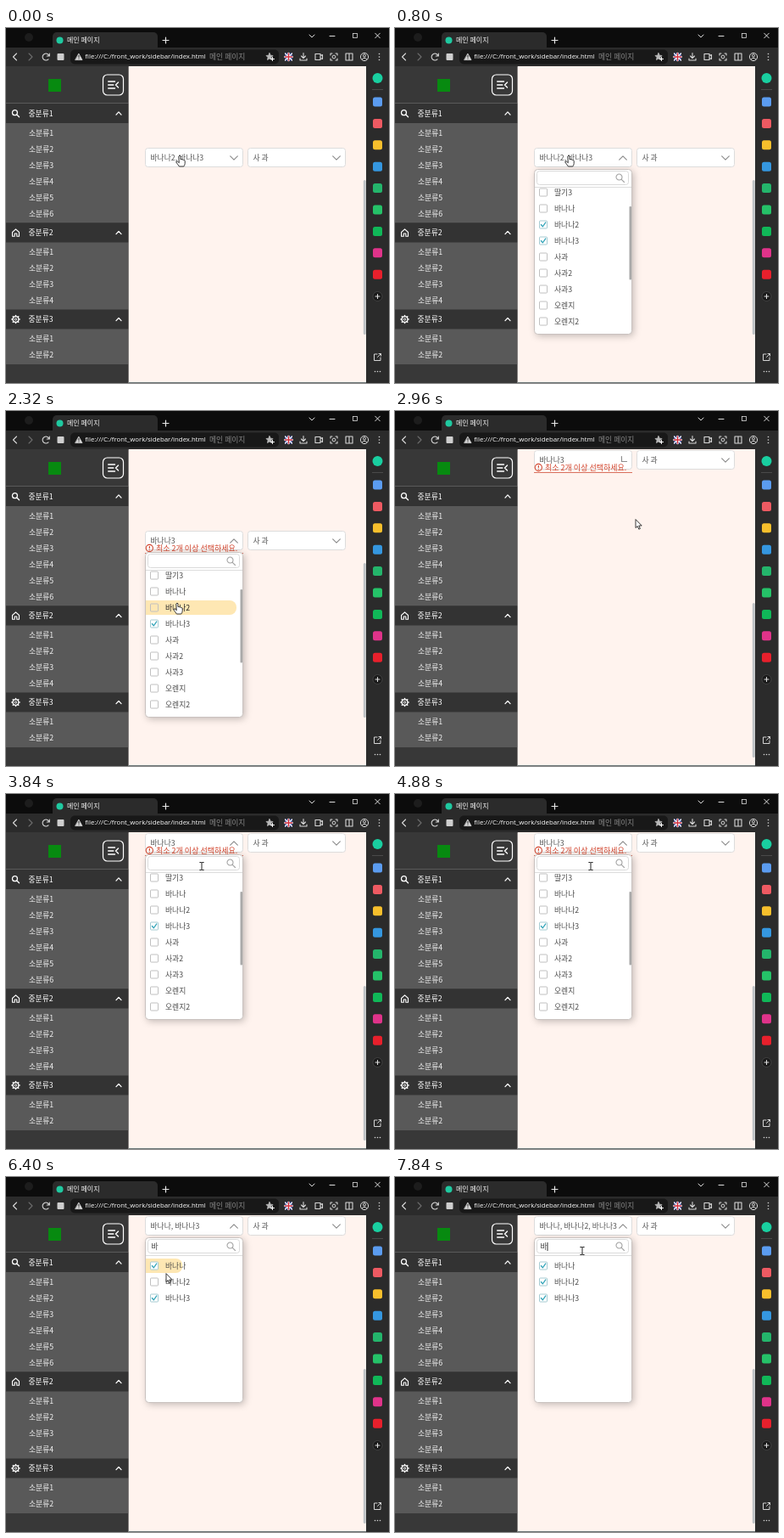
Write an HTML page with a canvas that moves like this. It is 452 by 418 pixels and loops after 8000 ms.

```html
<!DOCTYPE html>
<html lang="ko">
<head>
<meta charset="utf-8">
<title>메인 페이지</title>
<style>
html, body { margin: 0; width: 100%; height: 100%; overflow: hidden; background: #2b2b2b; }
canvas { display: block; width: 452px; height: 418px; }
</style>
</head>
<body>
<canvas id="stage"></canvas>
<script>
const W = 452, H = 418, LOOP = 8000;
const canvas = document.getElementById('stage');
const dpr = window.devicePixelRatio || 1;
canvas.width = W * dpr;
canvas.height = H * dpr;
const c = canvas.getContext('2d');
const KR = '"Noto Sans CJK KR", "Noto Sans CJK", "Noto Sans KR", sans-serif';

// Moments of the interaction, in ms
const T = { open: 160, uncheck: 1840, scroll: 2560, close: 2820, reopen: 3520,
  focus: 3900, jamo: 5120, typed: 5200, pick1: 6080, pick2: 6640, refocus: 7700 };
const SCROLL = 95, ROW = 19, FIRST_ROW = 199.5, LIST_SCROLL = 44;

const fruits = ['딸기', '바나나', '사과', '오렌지', '체리', '포도']
  .flatMap(n => [n, n + '2', n + '3']);

// time, x, y of the pointer
const path = [
  [0, 205, 150], [1500, 205, 150], [1770, 202, 226], [2390, 202, 226], [2550, 284, 140],
  [2700, 284, 128], [3300, 284, 128], [3500, 236, 60], [3600, 235, 60], [3840, 231, 85],
  [5200, 231, 85], [5420, 200, 103], [5520, 198, 127], [5860, 198, 127], [6000, 193, 105],
  [6240, 193, 105], [6320, 189, 112], [6400, 189, 114], [6520, 194, 124], [7240, 194, 124],
  [7560, 221, 87], [LOOP, 221, 87]
];

// row, pointer in, pointer out
const hovers = [
  ['딸기3', 1625, 1690], ['바나나', 1690, 1735], ['바나나2', 1735, 2470],
  ['바나나', 5370, 5474], ['바나나2', 5474, 5920], ['바나나', 5920, 6300],
  ['바나나2', 6430, 7300], ['바나나', 7300, 7410]
];

const clamp = v => Math.max(0, Math.min(1, v));
const ease = v => 1 - Math.pow(1 - clamp(v), 2.2);
const within = (t, a, b) => t >= a && t < b;

function rect(x, y, w, h, fill) {
  c.fillStyle = fill;
  c.fillRect(x, y, w, h);
}

function paint(fill, line, lw) {
  if (fill) { c.fillStyle = fill; c.fill(); }
  if (line) { c.strokeStyle = line; c.lineWidth = lw; c.stroke(); }
}

function round(x, y, w, h, r, fill, line, lw = 1) {
  c.beginPath();
  c.roundRect(x, y, w, h, r);
  paint(fill, line, lw);
}

function circle(x, y, r, fill, line, lw = 1) {
  c.beginPath();
  c.arc(x, y, r, 0, Math.PI * 2);
  paint(fill, line, lw);
}

function stroke(d, x, y, color, lw = 1, fill) {
  const p = new Path2D(d);
  c.save();
  c.translate(x, y);
  if (fill) { c.fillStyle = fill; c.fill(p); }
  c.strokeStyle = color;
  c.lineWidth = lw;
  c.lineCap = c.lineJoin = 'round';
  c.stroke(p);
  c.restore();
}

function text(s, x, y, color, size = 8.8, weight = 400, family = KR) {
  c.font = `${weight} ${size}px ${family}`;
  c.textBaseline = 'middle';
  c.fillStyle = color;
  c.fillText(s, x, y);
}

function magnifier(x, y, color, s, lw) {
  c.save();
  c.translate(x, y);
  c.scale(s, s);
  stroke('M1.8 1.8L5 5M2.5 -1A3.5 3.5 0 1 1 -4.5 -1A3.5 3.5 0 1 1 2.5 -1', 0, 0, color, lw);
  c.restore();
}

function drawTabs() {
  rect(0, 0, W, 24, '#0c0c0c');
  circle(27, 11, 5, '#1d1d1d');
  round(55, 5, 124, 22, [5, 5, 0, 0], '#2b2b2b');
  circle(63.5, 14.5, 4, '#1fc9a0');
  text('메인 페이지', 72, 14, '#f2f2f2', 8, 500);
  stroke('M-3.5 0H3.5M0 -3.5V3.5', 188.5, 14.5, '#e8e8e8', 1.2);
  stroke('M-3 -1.5L0 1.5L3 -1.5', 361, 9.5, '#ddd');
  stroke('M-3 0H3', 385, 9.5, '#ddd');
  c.strokeStyle = '#ddd';
  c.strokeRect(409.5, 6.5, 5, 5);
  stroke('M-2.8 -2.8L2.8 2.8M2.8 -2.8L-2.8 2.8', 438.5, 9, '#ddd');
}

function drawToolbar() {
  const ink = '#d8d8d8';
  rect(0, 23, W, 22.5, '#2b2b2b');
  stroke('M2 -4L-2 0L2 4', 10.5, 34, ink, 1.1);
  stroke('M-2 -4L2 0L-2 4', 29, 34, '#6c6c6c', 1.1);
  stroke('M4 -1A4 4 0 1 0 3 2.8M4.3 -4V-1H1.3', 47, 34, ink, 1.1);
  round(60.5, 30, 8, 8, 1, '#cfcfcf');
  round(76, 25.5, 246, 17, 5, '#181818');
  stroke('M0 -3.6L4 3.6H-4Z', 86, 34, ink, 0.8, ink);
  rect(85.5, 32, 1, 2.8, '#222');
  rect(85.5, 35.6, 1, 1, '#222');
  text('file:///C:/front_work/sidebar/index.html', 93.3, 34, '#fff', 7.8, 400, '"Open Sans", "Noto Sans", sans-serif');
  text('메인 페이지', 240, 34, '#858585', 8.8);
  stroke('M0 -4L1.3 -1.3L4 -1L2 1L2.5 4L0 2.6L-2.5 4L-2 1L-4 -1L-1.3 -1.3Z', 311, 33.5, '#b8b8b8', 0.8, '#b8b8b8');
  stroke('M-2 0H2M0 -2V2', 314.5, 36.5, '#fff', 1);
  // flag
  rect(329, 29.5, 9, 9, '#263a8c');
  stroke('M-4 -4L4 4M4 -4L-4 4', 333.5, 34, '#fff', 1.2);
  stroke('M-4 0H4M0 -4V4', 333.5, 34, '#fff', 2.6);
  stroke('M-4 0H4M0 -4V4', 333.5, 34, '#d32f3c', 1.4);
  stroke('M0 -4.5V1.5M-2.5 -1L0 1.5L2.5 -1M-4 2V4H4V2', 351, 34, ink, 1.1);
  stroke('M-4 -3.5H2V3.5H-4ZM2 -1.5L4.5 -2.5V2.5L2 1.5', 369, 34, ink, 1.1);
  stroke('M-4 -2V-4H-2M2 -4H4V-2M4 2V4H2M-2 4H-4V2', 387, 34, ink, 1.1);
  circle(387, 34, 1.9, null, ink);
  stroke('M-4 -4H4V4H-4ZM0 -4V4', 405, 34, ink, 1.1);
  circle(423, 34, 4.6, null, ink);
  circle(423, 32.5, 1.5, null, ink);
  stroke('M-2.7 2.8Q0 -0.5 2.7 2.8', 423, 34, ink);
  for (const y of [30.5, 34, 37.5]) circle(440.5, y, 0.8, ink);
}

function drawDock() {
  rect(425, 45, W - 425, H - 45, '#2b2b2b');
  circle(438.5, 59, 6, '#19cfa0');
  rect(432, 72, 13, 1, '#4a4a4a');
  const tiles = ['#5b9cf0', '#ee5a62', '#f7bf2c', '#3597e0', '#24b56b', '#25c268', '#10b858', '#e0338a', '#e8202c'];
  tiles.forEach((col, i) => round(433, 81.5 + i * 25.4, 11, 11, 2.5, col));
  circle(438.5, 316, 5.5, '#1a1a1a', '#484848', 0.8);
  stroke('M-2.5 0H2.5M0 -2.5V2.5', 438.5, 316, '#ddd', 1.1);
  stroke('M-0.5 -3.5H-4V4H3.5V0.5M0 0L4 -4M1.5 -4H4V-1.5', 438.5, 387.5, '#d5d5d5');
  for (const x of [435.5, 438.5, 441.5]) circle(x, 404.5, 0.8, '#d5d5d5');
}

function drawMenu() {
  rect(0, 45, 144.5, H - 45, '#383838');
  round(50, 60, 15, 15, 0, '#078a10');
  round(114.5, 55, 24, 24, 5, null, '#fff', 1.2);
  stroke('M-5.8 -4H2M-5.8 0H0.3M-5.8 4H2M6 -3L3 0L6 3', 126.5, 67, '#fff', 1.4);
  rect(0, 88, 144.5, 1, '#5a5a5a');
  [[89, 6], [229.5, 4], [331.5, 2]].forEach(([y, n], g) => {
    const mid = y + 11.5;
    rect(0, y, 144.5, 23, '#333');
    rect(0, y + 23, 144.5, n * ROW + 3.5, '#595959');
    text('중분류' + (g + 1), 26.5, mid, '#fff');
    stroke('M-3 1.6L0 -1.6L3 1.6', 133, mid, '#fff', 1.3);
    for (let i = 0; i < n; i++) text('소분류' + (i + 1), 27, mid + 23 + i * ROW, '#f4f4f4');
  });
  magnifier(11.3, 100.5, '#fff', 0.85, 1.5);
  stroke('M-4 -0.5L0 -4.2L4 -0.5V4.2H1.3V1H-1.3V4.2H-4Z', 11.5, 241, '#fff', 1.1);
  circle(11.5, 343, 3.4, null, '#fff', 1.3);
  circle(11.5, 343, 1.2, null, '#fff', 0.9);
  for (let i = 0; i < 8; i++) {
    const a = i * Math.PI / 4, x = Math.cos(a), y = Math.sin(a);
    stroke(`M${x * 4} ${y * 4}L${x * 4.6} ${y * 4.6}`, 11.5, 343, '#fff', 1.5);
  }
}

function isOpen(t) {
  return within(t, T.open, T.close) || t >= T.reopen;
}

function isChecked(name, t) {
  if (name === '바나나') return t >= T.pick1;
  if (name === '바나나2') return t < T.uncheck || t >= T.pick2;
  return name === '바나나3';
}

function turnAt(t) {
  const f = s => ease((t - s) / 300);
  if (t < T.close) return 180 * f(T.open);
  return t < T.reopen ? 180 * (1 - f(T.close)) : 180 * f(T.reopen);
}

function drawSelect(x, label, turn) {
  round(x + 0.5, 141.5, 115, 22, 3, '#fff', '#dcdcdc');
  text(label, x + 6.5, 153, '#555');
  c.save();
  c.translate(x + 105, 153);
  c.rotate(turn * Math.PI / 180);
  stroke('M-4.3 -2.1L0 2.1L4.3 -2.1', 0, 0, '#8d8d8d', 1.2);
  c.restore();
}

function drawError() {
  const red = '#d2422a';
  circle(169.3, 161.5, 4.1, null, red, 1.1);
  rect(168.8, 159, 1.1, 3, red);
  rect(168.8, 163, 1.1, 1.1, red);
  text('최소 2개 이상 선택하세요.', 177, 161.5, red, 9);
  rect(164, 167, 116, 1, '#d9705e');
}

function hoverWidth(name, t) {
  let w = 0;
  for (const [row, a, b] of hovers) {
    if (row !== name || t < a) continue;
    w = t < b ? ease((t - a) / 300) : ease((b - a) / 300) * (1 - ease((t - b) / 300));
  }
  return w * 107;
}

function drawRow(name, y, t) {
  const w = hoverWidth(name, t), on = isChecked(name, t);
  const hot = hovers.some(([row, a, b]) => row === name && within(t, a, b));
  if (w > 0.5) round(165, y - 8.5, w, 17, [0, Math.min(8, w), Math.min(8, w), 0], '#fee7b3');
  round(170.5, y - 4.5, 9, 9, 1, on ? '#fff' : null, on ? '#a5cbd2' : '#c0c0c0');
  if (on) stroke('M-2.6 0L-0.7 2.3L2.8 -2.6', 175, y, '#2fa3b8', 1.2);
  text(name, 188, y, hot ? '#222' : '#4a4a4a', 8.8, hot ? 500 : 400);
}

function drawDropdown(t) {
  c.save();
  c.shadowColor = 'rgba(0,0,0,.25)';
  c.shadowBlur = 8 * dpr;
  c.shadowOffsetX = c.shadowOffsetY = 2 * dpr;
  round(164.5, 166.5, 115, 194, 4, '#fff');
  c.restore();
  round(164.5, 166.5, 115, 194, 4, null, '#c9c2bf');
  round(167.5, 168.5, 108, 16, 3, '#fff', '#dadada');
  magnifier(265.5, 176.5, '#a3a3a3', 1, 1.1);
  rect(165, 187, 114, 1, '#ddd');

  const query = t < T.jamo ? '' : t < T.typed ? 'ㅂ' : '바';
  if (query) text(query, 171.5, 177, '#444');
  if (query && t < T.pick1) rect(171.5, 182, 8, 0.8, '#444');
  const blink = s => (t - s) % 1000 < 500;
  if (within(t, T.focus, T.jamo) && blink(T.focus)) rect(171.5, 172, 1, 10, '#333');
  if (t >= T.refocus && blink(T.refocus)) rect(179.5, 172, 1, 10, '#333');

  c.save();
  c.beginPath();
  c.rect(165, 188, 114, 171);
  c.clip();
  const top = FIRST_ROW - (query ? 0 : LIST_SCROLL);
  fruits.filter(n => n.startsWith(query)).forEach((n, i) => drawRow(n, top + i * ROW, t));
  if (!query) round(276.5, 210, 2.5, 86.5, 1, '#a9a9a9');
  c.restore();
}

function drawPage(t, scroll) {
  c.save();
  c.beginPath();
  c.rect(144.5, 45, 280.5, H - 45);
  c.clip();
  rect(144.5, 45, 281, H - 45, '#fff3ee');
  c.save();
  c.translate(0, -scroll);
  const label = fruits.filter(n => isChecked(n, t)).join(', ');
  drawSelect(164, label, turnAt(t));
  drawSelect(285, '사 과', 0);
  if (within(t, T.uncheck, T.pick1)) drawError();
  if (isOpen(t)) drawDropdown(t);
  c.restore();
  round(421.8, 179 + 47 * scroll / SCROLL, 3, 182, 1.5, '#bfc3c6');
  rect(144.5, 417, 281, 1, '#6d7778');
  c.restore();
}

function pointerAt(t) {
  const i = path.findIndex(p => p[0] > t);
  const [a, x0, y0] = path[i - 1], [b, x1, y1] = path[i];
  const v = (t - a) / (b - a), k = v * v * (3 - 2 * v);
  return [x0 + (x1 - x0) * k, y0 + (y1 - y0) * k];
}

function pointerKind(x, y, t, scroll) {
  const py = y + scroll;
  if (x < 164 || x > 280) return 'arrow';
  if (py > 141 && py < 164) return 'hand';
  if (!isOpen(t)) return 'arrow';
  if (py > 167 && py < 185) return 'beam';
  const off = py - FIRST_ROW + (t < T.jamo ? LIST_SCROLL : 0);
  const gap = Math.abs(off - Math.round(off / ROW) * ROW);
  return py > 188 && py < 360 && gap < 8.8 ? 'hand' : 'arrow';
}

function drawPointer(t, scroll) {
  const [x, y] = pointerAt(t);
  const kind = pointerKind(x, y, t, scroll);
  if (kind === 'beam') {
    stroke('M-2.2 -4.5H-0.7L0 -4L0.7 -4.5H2.2M0 -4V4M-2.2 4.5H-0.7L0 4L0.7 4.5H2.2', x, y, '#222', 1);
  } else if (kind === 'hand') {
    stroke('M-1 0.8Q0 -0.6 1 0.8V4.6Q2.2 3.8 2.9 5Q4.2 4.4 4.7 5.6Q6 5.2 6.2 6.6V9.5Q6 11.5 4.8 13H-0.6Q-2 11 -4.2 8Q-4 6.4 -2.4 7.2L-1 8.5Z', x, y, '#222', 0.9, '#fff');
  } else {
    stroke('M0 0V9.6L2.2 7.6L3.8 11.2L5.4 10.5L3.8 7H6.8Z', x, y, '#222', 0.9, '#fff');
  }
}

function draw(t) {
  const scroll = SCROLL * ease((t - T.scroll) / 220);
  c.setTransform(dpr, 0, 0, dpr, 0, 0);
  drawTabs();
  drawToolbar();
  drawMenu();
  drawPage(t, scroll);
  drawDock();
  drawPointer(t, scroll);
}

const start = performance.now();
function tick() {
  draw((performance.now() - start) % LOOP);
  requestAnimationFrame(tick);
}
tick();
</script>
</body>
</html>
```
